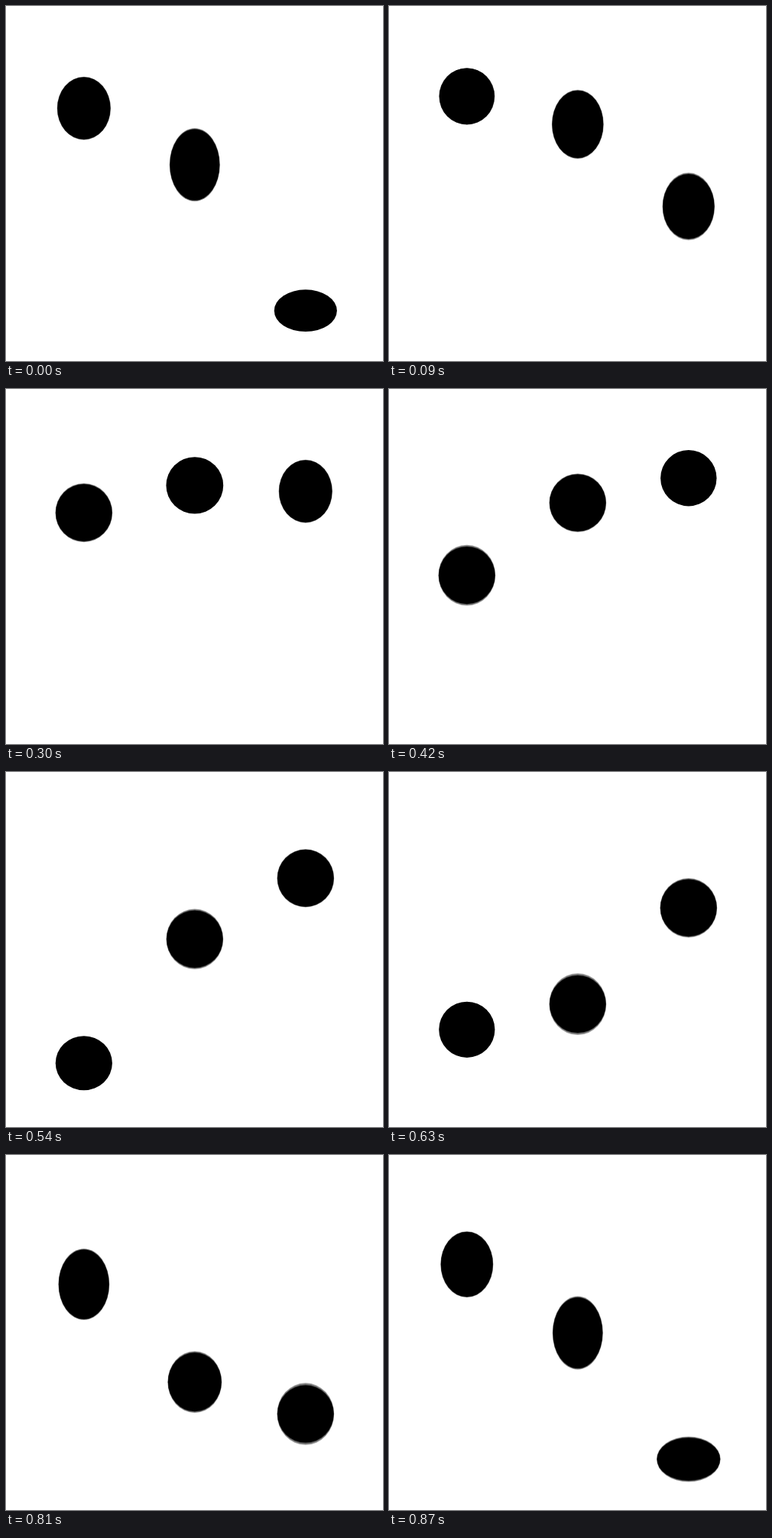
Write an HTML page with a canvas that moves like this. It is 500 px wide and 471 px high and loops after 0.9 s.

```html
<!DOCTYPE html>
<html lang="en">
<head>
<meta charset="utf-8">
<title>Bouncing dots</title>
<style>
  html, body { margin: 0; width: 100%; height: 100%; overflow: hidden; background: #fff; }
  canvas { display: block; width: 500px; height: 471px; }
</style>
</head>
<body>
<canvas id="stage" width="500" height="471"></canvas>
<script>
const ctx = document.getElementById('stage').getContext('2d');
const STEP = 30, COUNT = 30;
const dots = [{ x: 103.3, shift: 10 }, { x: 250.3, shift: 5 }, { x: 397.3, shift: 0 }];

// Poses around the impact: y, rx, ry, soft edge
const impact = {
  28: [386.3, 37.6, 36, 0],
  29: [403.6, 42.4, 30.2, 1.8],
  0: [404.2, 41.6, 27.9, 0],
  1: [341.8, 37.1, 37.1, 0]
};

function pose(n) {
  if (impact[n]) return impact[n];
  if (n < 15) {
    // Rise: decelerating, stretched early on
    const u = 14 - n;
    const stretch = Math.min(1, (n - 1) / 3) * (1 - Math.cos(Math.PI * Math.min(u, 9) / 9)) / 2;
    const y = 118.2 + 0.78 * u + 0.86 * u ** 2 + 0.0024 * u ** 4;
    return [y, 37.2 - 3.7 * stretch, 37.2 + 11.5 * stretch, 0.17 * u];
  }
  // Fall: accelerating, with a vertical smear
  const u = n - 15;
  return [127.9 + (1.44 + 0.0004 * u * u) * u * u, 37.9, 37.7 + 0.3 * u, 0.27 * u];
}

function ellipse(x, y, rx, ry, alpha) {
  ctx.globalAlpha = alpha;
  ctx.beginPath();
  ctx.ellipse(x, y, rx, ry, 0, 0, Math.PI * 2);
  ctx.fill();
}

function drawDot(x, [y, rx, ry, soft]) {
  if (soft) {
    for (let i = 0; i < 3; i++) ellipse(x, y, rx - i * 0.2, ry - soft * i / 3, 0.32);
  }
  ellipse(x, y, soft ? rx - 0.6 : rx, ry - soft, 1);
}

function render(now) {
  const step = Math.floor(now / STEP);
  ctx.globalAlpha = 1;
  ctx.fillStyle = '#fff';
  ctx.fillRect(0, 0, 500, 471);
  ctx.fillStyle = '#000';
  for (const { x, shift } of dots) drawDot(x, pose((step + shift) % COUNT));
}

const start = performance.now();
function loop() {
  render(performance.now() - start);
  requestAnimationFrame(loop);
}
loop();
</script>
</body>
</html>
```
